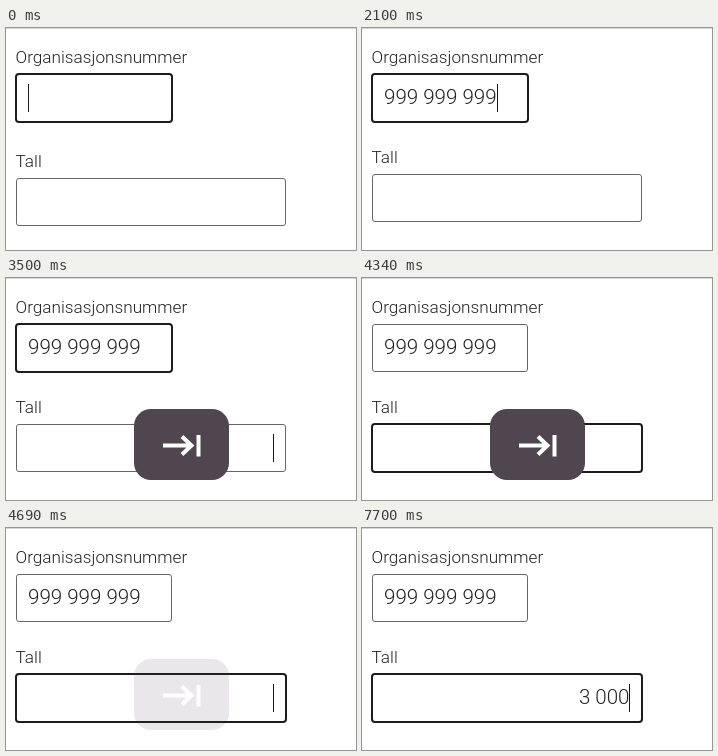
Write an HTML page that moves like this. It is 350 px wide and 222 px high and loops after 8 s.

```html
<!DOCTYPE html>
<html lang="nb">
<head>
<meta charset="utf-8">
<title>Skjemafelt</title>
<style>
  html, body { margin: 0; width: 100%; height: 100%; overflow: hidden; background: #fff; }
  svg { display: block; width: 350px; height: 222px; }
  text { font-family: Roboto, Inter, sans-serif; font-weight: 300; fill: #222; white-space: pre; }
  .label { font-size: 17.2px; }
  .value { font-size: 20.55px; }
  .thin { fill: none; stroke: #666; }
  .thick { fill: none; stroke: #1c1c1c; stroke-width: 2; }
  .caret { fill: #1a1a1a; }
</style>
</head>
<body>
<svg viewBox="0 0 350 222">
  <rect width="350" height="1" fill="#d6d6d6"/>
  <g id="org">
    <text class="label" x="9.5" y="35">Organisasjonsnummer</text>
    <rect class="thin" x="10.5" y="46.5" width="155" height="47" rx="2.5"/>
    <rect class="thick" x="10" y="46" width="156" height="48" rx="3"/>
    <text class="value" x="22" y="76.3"></text>
    <rect class="caret" x="22" y="56" width="1" height="28"/>
  </g>
  <g id="num">
    <text class="label" x="9.5" y="35">Tall</text>
    <rect class="thin" x="10.5" y="46.5" width="269" height="47" rx="2.5"/>
    <rect class="thick" x="10" y="46" width="270" height="48" rx="3"/>
    <text class="value" x="267.5" y="76.3" text-anchor="end"></text>
    <rect class="caret" x="267" y="56" width="1" height="28"/>
  </g>
  <g id="key">
    <rect x="128" y="131" width="95" height="71" rx="17" fill="#50464f"/>
    <path d="M157 167.5H185M176 158.5L185.5 167.5L176 176.5M192.5 157V178.5" fill="none" stroke="#fff" stroke-width="4"/>
  </g>
</svg>
<script>
  const LOOP = 8000, TICK = 70, TAB = 3500;
  const orgKeys = [420, 630, 770, 910, 1120, 1260, 1470, 1610, 2100];
  const numKeys = [[6580, "3"], [7350, "30"], [7560, "300"], [7700, "3 000"]];
  // Times at which the caret switches, starting visible
  const blinks = [280, 420, 2660, 3150, 4060, 4550, 5110, 5670, 6160, 6580, 7070, 7350];

  const parts = id => {
    const root = document.getElementById(id);
    const get = name => root.querySelector("." + name);
    return { root, thin: get("thin"), thick: get("thick"), value: get("value"), caret: get("caret") };
  };
  const org = parts("org"), num = parts("num");
  const key = document.getElementById("key");

  const clamp = v => Math.min(1, Math.max(0, v));
  const past = (list, t) => list.filter(at => at <= t).length;
  const group = n => "9".repeat(n).replace(/(...)(?=.)/g, "$1 ");

  function setFocus(field, k) {
    field.thick.setAttribute("opacity", k);
    field.thin.setAttribute("opacity", 1 - k);
  }

  function setText(field, text) {
    if (field.value.textContent !== text) field.value.textContent = text;
  }

  function draw(time) {
    const t = Math.floor(time / TICK) * TICK;

    setText(org, group(past(orgKeys, t)));
    const width = org.value.textContent ? org.value.getComputedTextLength() : 0;
    org.caret.setAttribute("x", Math.round(22 + width));

    const typed = numKeys.filter(([at]) => at <= t).pop();
    setText(num, typed ? typed[1] : "");
    num.root.setAttribute("transform", `translate(0 ${t < 910 ? 104 : 100})`);

    const lit = past(blinks, t) % 2 === 0;
    org.caret.setAttribute("opacity", lit && t < TAB ? 1 : 0);
    num.caret.setAttribute("opacity", lit && t >= TAB ? 1 : 0);

    const shift = clamp((t - TAB) / 210);
    setFocus(org, 1 - shift);
    setFocus(num, shift);

    const fade = (1 - clamp((t - 4480) / 350)) ** 2.3;
    key.setAttribute("opacity", t < TAB ? 0 : fade);
  }

  const start = performance.now();
  function frame() {
    draw((performance.now() - start) % LOOP);
    requestAnimationFrame(frame);
  }
  frame();
</script>
</body>
</html>
```
